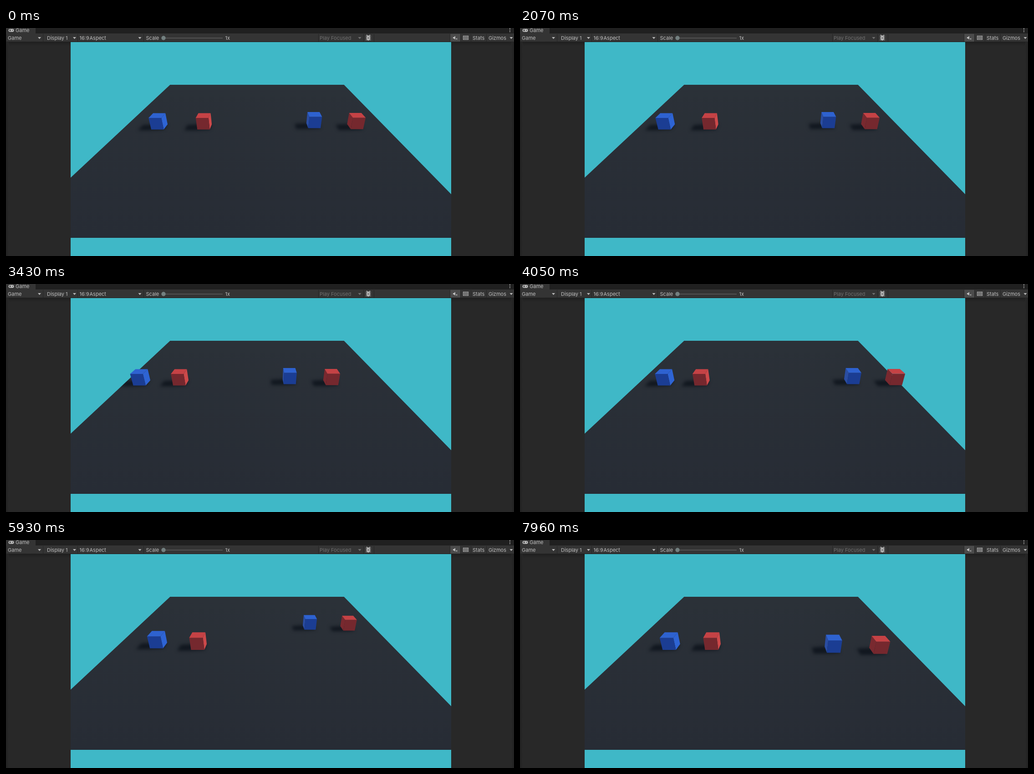
An HTML page with a canvas that plays this animation: 1116x502 px, repeating every 8000 ms.

```html
<!DOCTYPE html>
<html lang="en">
<head>
<meta charset="utf-8">
<title>Game view</title>
<style>
html, body { margin: 0; width: 1116px; height: 502px; overflow: hidden; background: #282828; }
canvas { display: block; }
</style>
</head>
<body>
<canvas id="stage" width="1116" height="502"></canvas>
<script>
const ctx = document.getElementById('stage').getContext('2d');
const LOOP = 8000, STEP = 70, PHASE = 40;

// Camera pitched down 30 degrees, 9 units above the floor
const SIN = 0.5, COS = Math.sqrt(3) / 2, FOCAL = 568;
function project(x, y, z) {
  const h = 9 - y, depth = z * COS + h * SIN;
  return [559.75 + FOCAL * x / depth, 266.5 + FOCAL * (h * COS - z * SIN) / depth];
}

// Key presses that drive all four cubes
const press = (start, end, x, z) => ({ start, end, x, z });
const presses = [
  press(1830, 2045, -1, 0), press(2570, 2780, -1, 0), press(3270, 3460, -1, 0),
  press(3645, 4391, 1, 0),
  press(4596, 5490, 0, -1), press(5490, 6885, 0, 1), press(6885, LOOP, 0, -1)
];
const SPEED = 2.6 / 1000, COAST = 96;

// Left pair: travels while a key is held, plus a coasting time after release
function travelled(axis, t, coast) {
  return presses.reduce((sum, p) => {
    const held = Math.max(0, Math.min(t, p.end + coast) - p.start);
    return sum + p[axis] * held * SPEED;
  }, 0);
}
// Right pair: jumps to the side of the held key
function held(axis, t) {
  const key = presses.find(p => t >= p.start && t < p.end);
  return key ? key[axis] : 0;
}

const blue = { top: '#2e62d0', front: '#1b3d93', right: '#2e64d4', left: '#2a4da2' };
const red = { top: '#c54245', front: '#75282e', right: '#cd494a', left: '#79292f' };

function poly(points, fill) {
  ctx.beginPath();
  points.forEach(p => ctx.lineTo(p[0], p[1]));
  ctx.closePath();
  if (fill) {
    ctx.fillStyle = fill;
    ctx.fill();
  }
}
const floor = [[360.5, 125], [742.5, 125], [978, 366], [978, 462], [142, 462], [142, 329.5]];

function shadow(x, z) {
  const l = x - .5, r = x + .5, b = z + 1, dx = -1, dz = -.15;
  const outline = [[l, b], [r, b], [r, z], [r + dx, z + dz], [l + dx, z + dz], [l + dx, b + dz]];
  ctx.save();
  poly(floor);
  ctx.clip();
  ctx.filter = 'blur(3.5px)';
  poly(outline.map(p => project(p[0], 0, p[1])), 'rgba(14,19,28,.85)');
  ctx.restore();
}

function cube(x, z, color) {
  const l = x - .5, r = x + .5, b = z + 1;
  const face = (corners, fill) => poly(corners.map(c => project(...c)), fill);
  const side = (s, fill) => face([[s, 1, z], [s, 1, b], [s, 0, b], [s, 0, z]], fill);
  shadow(x, z);
  if (r < 0) side(r, color.right);
  if (l > 0) side(l, color.left);
  face([[l, 1, z], [r, 1, z], [r, 0, z], [l, 0, z]], color.front);
  face([[l, 1, z], [r, 1, z], [r, 1, b], [l, 1, b]], color.top);
}

function rect(x, y, w, h, fill) {
  ctx.fillStyle = fill;
  ctx.fillRect(x, y, w, h);
}
function dot(x, y, r, fill) {
  ctx.beginPath();
  ctx.arc(x, y, r, 0, 7);
  ctx.fillStyle = fill;
  ctx.fill();
}
function lines(width, ...segments) {
  ctx.lineWidth = width;
  ctx.beginPath();
  for (const [x0, y0, x1, y1] of segments) {
    ctx.moveTo(x0, y0);
    ctx.lineTo(x1, y1);
  }
  ctx.stroke();
}
function fade(x0, y0, x1, y1, from, to) {
  const g = ctx.createLinearGradient(x0, y0, x1, y1);
  g.addColorStop(0, from);
  g.addColorStop(1, to);
  return g;
}

const LIGHT = '#c0c0c0', DIM = '#707070', BAR = '#343434';
function label(text, x, y = 26, fill = LIGHT) {
  ctx.fillStyle = fill;
  ctx.fillText(text, x, y);
}
function arrow(x, fill = '#b8b8b8') {
  poly([[x - 3.5, 20], [x + 3.5, 20], [x, 24.2]], fill);
}

function gamepadIcon() {
  ctx.beginPath();
  ctx.roundRect(5.5, 2, 12, 6.5, 3.2);
  ctx.fillStyle = LIGHT;
  ctx.fill();
  rect(7, 4.5, 4, 1.2, BAR);
  rect(8.4, 3.2, 1.2, 4, BAR);
  dot(14.3, 5, 1.1, BAR);
}
function bugIcon(x, y) {
  const legs = [-3, 1, 5].map(dy => [x - 6, y + dy, x + 6, y + dy]);
  lines(1.2, ...legs, [x - 4, y - 6, x, y - 2], [x + 4, y - 6, x, y - 2]);
  ctx.beginPath();
  ctx.ellipse(x, y + 1, 3.8, 5.5, 0, 0, 7);
  ctx.fillStyle = LIGHT;
  ctx.fill();
  rect(x - 2, y - 1, 4, 1, BAR);
  rect(x - 2, y + 2, 4, 1, BAR);
}
function muteIcon() {
  poly([[982, 20], [984, 20], [987, 17.5], [987, 25.5], [984, 23], [982, 23]], LIGHT);
  lines(1, [988.5, 22.5, 991.5, 25.5], [991.5, 22.5, 988.5, 25.5]);
}
function keyboardIcon() {
  ctx.strokeRect(1004.5, 17.5, 11, 8);
  for (let i = 0; i < 6; i++) rect(1006 + i % 3 * 3, i < 3 ? 19 : 22, 2, 2, LIGHT);
}

function toolbar() {
  rect(0, 0, 1116, 31, '#202020');
  rect(0, 0, 65, 12, BAR);
  rect(0, 12, 1116, 18, BAR);
  rect(976, 13, 22, 17, '#4b4b4b');
  for (const x of [0, 81, 157, 302, 686, 785, 808, 975, 998, 1021, 1055])
    rect(x, 13, 1, 17, '#252525');

  ctx.font = '11px Inter, sans-serif';
  label('Game', 21, 9);
  label('Game', 4);
  label('Display 1', 90);
  label('16:9', 161.5);
  label('Aspect', 183.5);
  label('Scale', 307.5);
  label('1x', 481.5);
  label('Play Focused', 689, 26, DIM);
  label('Stats', 1025);
  label('Gizmos', 1060);
  [73.5, 150.5, 294, 1110].forEach(x => arrow(x));
  arrow(777, DIM);

  rect(346, 21.5, 130, 1.5, '#5c5c5c');
  dot(346, 22, 4.7, '#738080');

  ctx.strokeStyle = LIGHT;
  gamepadIcon();
  bugIcon(796, 21);
  muteIcon();
  keyboardIcon();
  for (let i = 0; i < 3; i++) dot(1107, 1 + i * 3.5, 1, LIGHT);
}

function scene() {
  rect(0, 31, 1116, 471, '#282828');
  rect(0, 31, 1116, 9, fade(0, 31, 0, 40, '#202020', '#282828'));
  for (const [x, edge, inner] of [[0, 0, 6], [1110, 1116, 1110]])
    rect(x, 31, 6, 471, fade(edge, 0, inner, 0, '#222222', '#282828'));
  rect(142, 31, 836, 471, '#3fb8c7');
  poly(floor, fade(0, 125, 0, 462, '#2b3138', '#272c35'));
}

function draw(time) {
  const t = Math.floor((time - PHASE) / STEP) * STEP + PHASE;
  const jumpX = 2 * held('x', t), jumpZ = 2.15 * held('z', t);
  scene();
  cube(-8.28 + travelled('x', t, 0), 18.73 + travelled('z', t, 0), blue);
  cube(-4.59 + travelled('x', t, COAST), 18.73 + travelled('z', t, COAST), red);
  cube(4.34 + jumpX, 18.97 + jumpZ, blue);
  cube(7.72 + jumpX, 18.78 + jumpZ, red);
  toolbar();
}

const began = performance.now();
function tick() {
  draw((performance.now() - began) % LOOP);
  requestAnimationFrame(tick);
}
tick();
</script>
</body>
</html>
```
